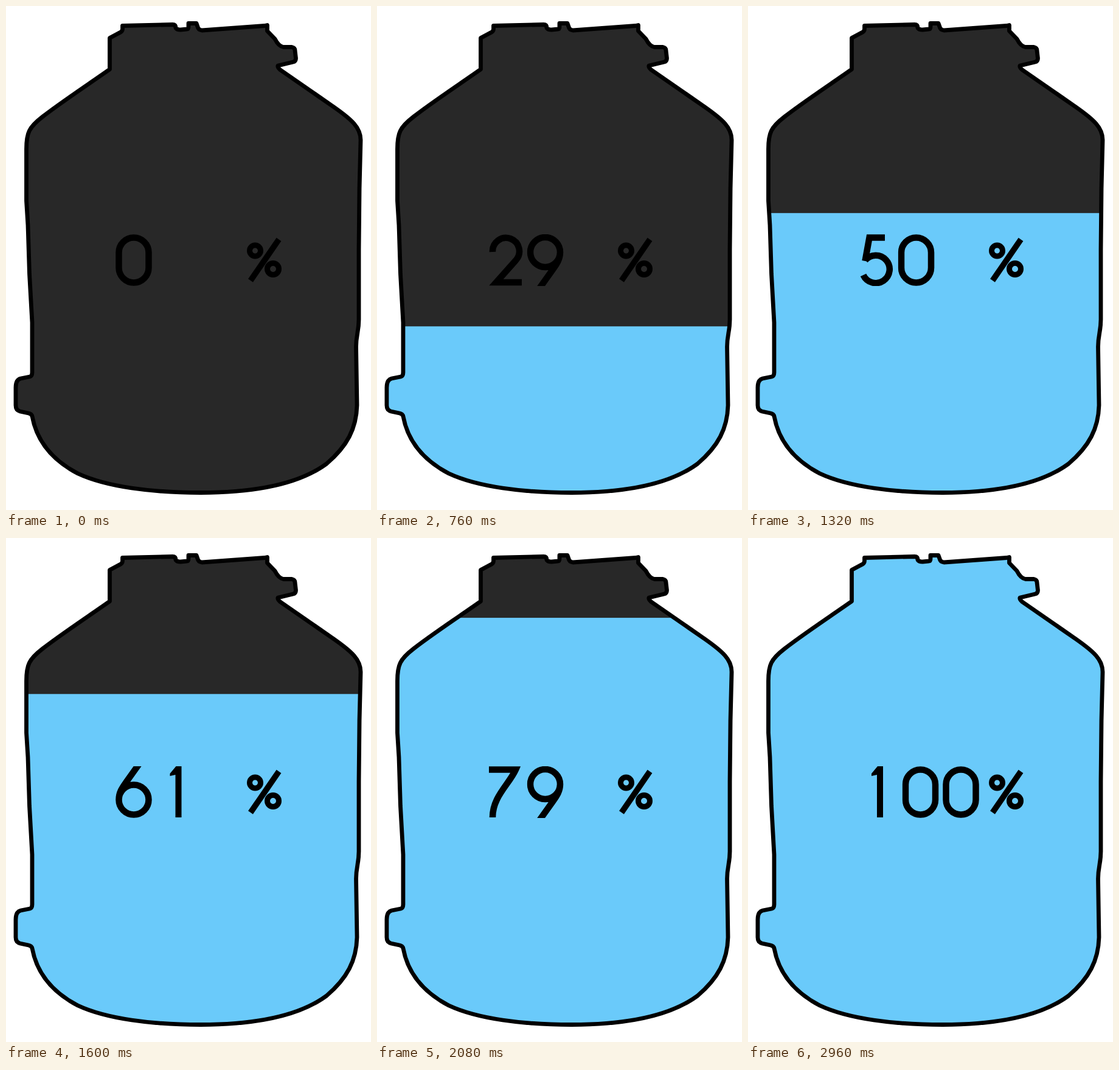
An HTML page for the animation above (3 s loop, 600x828 px).

```html
<!DOCTYPE html>
<html lang="en">
<head>
<meta charset="utf-8">
<title>Filling jar</title>
<style>
  html, body { margin: 0; width: 100%; height: 100%; overflow: hidden; background: #fff; }
  svg { display: block; }
  #stage { width: 100%; height: 100%; }
  .ink { fill: none; stroke: #000; stroke-width: 10.5; }
  .solid { fill: #000; stroke: none; }
</style>
</head>
<body>
<svg id="stage" viewBox="0 0 600 828" role="img" aria-label="0 %">
  <defs>
    <path id="jar" d="M191.500 32.500L274 30.500Q279 30.500 279 36Q281 39 287 39L297 38Q300 38 300 34V28.500H313L315 34Q316 39 322 40L425 32.500L429.500 31.500V41L442 54Q448 66 456 67.500H470Q475 68.500 475 73L476.500 86Q476.500 91 472 92L447 98Q446 101 451 105L539 166
      C569 187 583 200 583 220L581 300L580 400V515C580 535 575.500 540 575.500 560L577 656
      C576 694 561 723 527 752C485 783 415 799.500 320 799.500
      C240 799.500 165 790 118 768C74 745 50 712 43 674Q42 670 37 669L23 666Q16 664 16 656V627Q16 614 24 612L39 609Q43 608 43 602V520L38.500 440L36 360L33.500 320V235
      C33.500 208 38 199 60 182C88 160 129 133 170.500 104V52.500L185.500 44.500Q191.500 42 191.500 38Z"/>
    <clipPath id="inside"><use href="#jar"/></clipPath>
  </defs>
  <use href="#jar" fill="#282828"/>
  <rect id="water" width="600" height="828" y="800" fill="#6acafa" clip-path="url(#inside)"/>
  <use href="#jar" fill="none" stroke="#000" stroke-width="6.800" stroke-linejoin="round"/>
  <g id="digits"></g>
  <g class="ink">
    <path stroke-width="9.500" d="M448.500 383.500L402 451"/>
    <g stroke-width="9"><circle cx="409.500" cy="402" r="9"/><circle cx="439" cy="432" r="9.500"/></g>
  </g>
</svg>
<script>
  // Glyph outlines; each is clipped to a box 85 high starting at (0, 0)
  const glyphs = [
    'M5.5 30a24.5 24.5 0 0 1 49 0V55a24.5 24.5 0 0 1-49 0Z',
    'M33 0H42V84H32V14L23 16V12Z',
    'M10 29A22 22 0 1 1 48 43L16 79H58',
    'M10 24A20 19 0 1 1 30 40A22 20 0 1 1 8 63',
    'M38 0L11 60H60M43 35V84',
    'M45 5.5H19.5L12.5 44M12.5 43A22.7 22.7 0 1 1 9.5 67',
    'M5.5 55a24.5 24.5 0 1 0 49 0a24.5 24.5 0 1 0-49 0C5.5 42 12 34 19 24L39-4',
    'M4 5.5H48C37 30 10 50 10 84',
    'M12 22a18 17 0 1 0 36 0a18 17 0 1 0-36 0M7 59a23 20 0 1 0 46 0a23 20 0 1 0-46 0',
    'M54.5 29.5a24.5 24.5 0 1 0-49 0a24.5 24.5 0 1 0 49 0C54.5 42 48 50 41 60L21 88'
  ];
  const STEP = 40, LOOP = 3000, FULL = 66;
  const stage = document.getElementById('stage');
  const water = document.getElementById('water');
  const digits = document.getElementById('digits');
  let shown = -1;

  function showNumber(value) {
    if (value === shown) return;
    shown = value;
    let x = 180;
    digits.innerHTML = [...String(value)].map(d => {
      const one = d === '1';
      const mark = `<svg x="${x}" y="375" width="66" height="85"><path class="${one ? 'solid' : 'ink'}" d="${glyphs[d]}"/></svg>`;
      x += one ? 73.5 : 66.5;
      return mark;
    }).join('');
    stage.setAttribute('aria-label', value + ' %');
  }

  const start = performance.now();
  function draw() {
    const tick = Math.floor((performance.now() - start) % LOOP / STEP);
    const n = Math.min(tick, FULL);
    // The level slows down along a sine while the counter runs evenly
    water.setAttribute('y', (801.5 - 867 * Math.sin(0.017 * n)).toFixed(1));
    showNumber(Math.round(n * 100 / FULL));
    requestAnimationFrame(draw);
  }
  draw();
</script>
</body>
</html>
```
